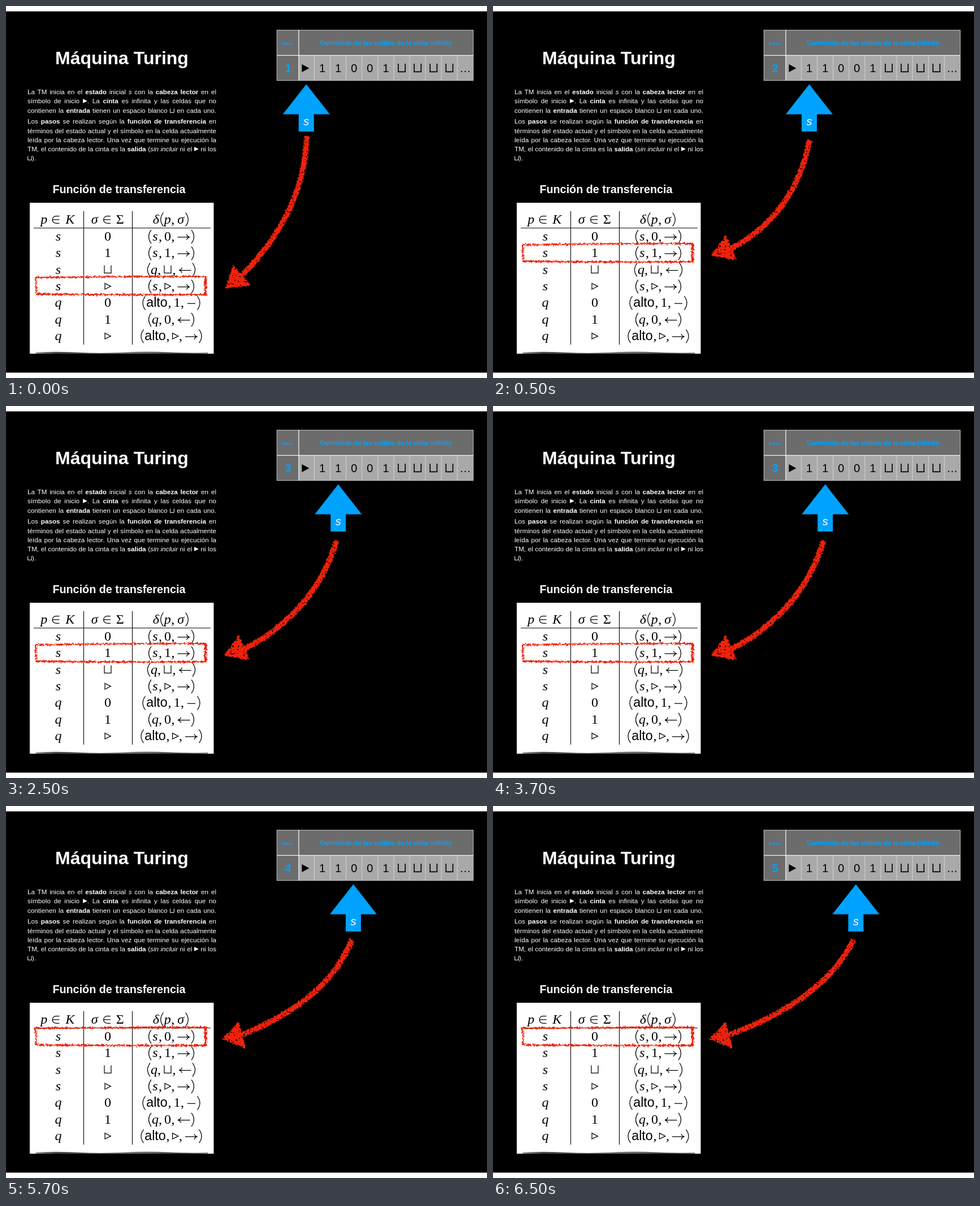
An HTML page for the animation above (8 s loop, 851 by 658 pixels).

```html
<!DOCTYPE html>
<html lang="es">
<head>
<meta charset="utf-8">
<title>Máquina Turing</title>
<style>
  html, body { margin: 0; width: 100%; height: 100%; overflow: hidden; background: #fff; }
  #stage { position: absolute; left: 0; top: 0; width: 851px; height: 658px; }
  svg text { font-family: "Liberation Sans", Arial, sans-serif; text-anchor: middle; }
  svg .math { font-family: "Liberation Serif", "Times New Roman", serif; font-size: 24px; }
  svg .it { font-style: italic; }
  .line {
    position: absolute; left: 38px; width: 334px; height: 16px;
    font: 11.7px/16px "Liberation Sans", Arial, sans-serif; color: #fff;
    white-space: nowrap; text-align: justify; text-align-last: justify;
  }
  .line.last { text-align-last: left; }
  .line svg { width: 8px; height: 8px; vertical-align: 0; }
</style>
</head>
<body>
<svg id="stage" viewBox="0 0 851 658">
  <defs>
    <filter id="chalk" filterUnits="userSpaceOnUse" x="30" y="220" width="640" height="300" color-interpolation-filters="sRGB">
      <feTurbulence type="fractalNoise" baseFrequency=".3" numOctaves="2" seed="7" result="grain"/>
      <feDisplacementMap in="SourceGraphic" in2="grain" scale="6" xChannelSelector="R" yChannelSelector="G" result="rough"/>
      <feColorMatrix in="grain" values="0 0 0 0 0  0 0 0 0 0  0 0 0 0 0  0 0 14 0 -9.1" result="holes"/>
      <feComposite in="rough" in2="holes" operator="out"/>
    </filter>
    <linearGradient id="fade">
      <stop offset="0" stop-color="#999"/><stop offset=".12" stop-color="#444"/>
      <stop offset=".5" stop-color="#777"/><stop offset=".88" stop-color="#444"/>
      <stop offset="1" stop-color="#999"/>
    </linearGradient>
    <filter id="soft" x="-5%" y="-100%" width="110%" height="300%"><feGaussianBlur stdDeviation=".7"/></filter>
  </defs>

  <rect y="9.5" width="851" height="639"/>
  <g fill="#fff" font-weight="bold">
    <text x="205" y="102.5" font-size="32">Máquina Turing</text>
    <text x="200" y="331" font-size="19.8">Función de transferencia</text>
  </g>

  <rect x="479" y="42.5" width="348" height="89.5" fill="#6c6c6c"/>
  <rect x="518" y="87" width="309" height="45" fill="#a9a9a9"/>
  <g id="tape"></g>
  <path d="M479 87.3H827M518 42V132" stroke="#f4f4f4" stroke-width="1.3"/>
  <rect x="479.3" y="42.8" width="347.4" height="89" fill="none" stroke="#c4c4c4"/>
  <g fill="#00a2ff" font-weight="bold">
    <text x="499.4" y="69" font-size="8" letter-spacing=".8">Paso</text>
    <text x="672" y="69.3" font-size="11.6">Contenido de las celdas de la cinta infinita</text>
    <text id="step" x="499" y="117.3" font-size="20"></text>
  </g>

  <g id="head">
    <path d="M0 138.5L41.5 191.5H13.5V222H-13.5V191.5H-41.5Z" fill="#00a2ff"/>
    <text class="it" x="0" y="211" font-size="20" fill="#fff">s</text>
  </g>

  <rect x="42" y="348" width="325.5" height="267" fill="#fff"/>
  <path d="M52 612.5Q90 611 130 612.8T210 612.6T290 612.6T358 612.4L357 615H53Z" fill="url(#fade)" filter="url(#soft)"/>
  <path d="M49 392.8H362M137.5 363V599M223.5 363V599" stroke="#000" stroke-width="1.1"/>
  <g id="rules"></g>

  <g filter="url(#chalk)" fill="none" stroke="#ee220c">
    <g id="frame"></g>
    <path id="tail" stroke-width="9.5"/>
    <path id="tip" fill="#ee220c" stroke-width="2" stroke-linejoin="round"/>
  </g>
</svg>

<script>
const $ = id => document.getElementById(id);

// Paragraph
const icon = d => `<svg viewBox="0 0 8 8">${d}</svg>`;
const play = icon('<path d="M0 .3L8 4L0 7.7Z" fill="#fff"/>');
const cup = icon('<path d="M.7 .5V7.4H7.3V.5" fill="none" stroke="#fff"/>');
const lines = [
  [156, "La TM inicia en el <b>estado</b> inicial <i>s</i> con la <b>cabeza lector</b> en el"],
  [172.4, `símbolo de inicio ${play}. La <b>cinta</b> es infinita y las celdas que no`],
  [189, `contienen la <b>entrada</b> tienen un espacio blanco ${cup} en cada uno.`],
  [208.3, "Los <b>pasos</b> se realizan según la <b>función de transferencia</b> en"],
  [224.5, "términos del estado actual y el símbolo en la celda actualmente"],
  [240.5, "leída por la cabeza lector. Una vez que termine su ejecución la"],
  [257, `TM, el contenido de la cinta es la <b>salida</b> (<i>sin incluir</i> ni el ${play} ni los`],
  [273.3, `${cup}).`]
];
lines.forEach(([base, html], i) => {
  const last = i === lines.length - 1 ? " last" : "";
  document.body.insertAdjacentHTML("beforeend",
    `<div class="line${last}" style="top:${base - 12}px">${html}</div>`);
});

// Tape cells
const pitch = 28.1;
$("tape").innerHTML = [..."▶11001⊔⊔⊔⊔…"].map((c, i) => {
  const x = 531.5 + i * pitch;
  const edge = i ? `<path d="M${x - pitch / 2} 88V131" stroke="#d2d2d2"/>` : "";
  if (c === "▶") return '<path d="M523.5 103L536.5 110L523.5 117Z"/>';
  if (c === "⊔") return `${edge}<path d="M${x - 6} 102V116.3H${x + 6.2}V102" fill="none" stroke="#000" stroke-width="1.7"/>`;
  return `${edge}<text x="${x}" y="117.3" font-size="20">${c}</text>`;
}).join("");

// Formula glyphs: slot width, then a stroked path or a text class
const shapes = {
  "(": [9, "M7.5-19Q-1.5-7 7.5 5"],
  ")": [9, "M1.5-19Q10.5-7 1.5 5"],
  "→": [24, "M1-6.2H22.5M17-11Q18.5-7 22.5-6.2Q18.5-5.4 17-1.4"],
  "←": [24, "M23-6.2H1.5M7-11Q5.5-7 1.5-6.2Q5.5-5.4 7-1.4"],
  "⊔": [16, "M2-15V-1.4H14V-15"],
  "▷": [12, "M1-12.5L11.3-7.2L1-2Z"],
  "−": [18, "M2-6.2H16"],
  "∈": [16, "M14.5-13H8.5A6.4 6.4 0 0 0 8.5-.2H14.5M2-6.6H14.5"]
};
const letters = {
  s: 11, q: 11, p: 12, δ: 11, σ: 14, K: 21, Σ: 17, 0: 12, 1: 12, ",": 10.5, alto: 38, " ": 6.8
};
const widthOf = g => shapes[g] ? shapes[g][0] : letters[g];

function formula(source, center, base) {
  const glyphs = source.match(/alto|./gu);
  let x = center - glyphs.reduce((sum, g) => sum + widthOf(g), 0) / 2;
  return glyphs.map(g => {
    const left = x, w = widthOf(g);
    x += w;
    if (g === " ") return "";
    if (shapes[g]) {
      return `<path transform="translate(${left} ${base})" d="${shapes[g][1]}" fill="none" stroke="#000" stroke-width="1.25"/>`;
    }
    if (g === "alto") return `<text x="${left + w / 2}" y="${base}" font-size="23.3">${g}</text>`;
    const mid = left + (g === "," ? 3.5 : w / 2);
    const slant = /[a-zK]|[σδ]/.test(g) ? " it" : "";
    return `<text class="math${slant}" x="${mid}" y="${base}">${g}</text>`;
  }).join("");
}

const rowGap = 29.35;
const table = [
  ["s", "0", "(s,0,→)"], ["s", "1", "(s,1,→)"], ["s", "⊔", "(q,⊔,←)"], ["s", "▷", "(s,▷,→)"],
  ["q", "0", "(alto,1,−)"], ["q", "1", "(q,0,←)"], ["q", "▷", "(alto,▷,→)"]
];
const columns = [92.5, 180, 292.5];
const tableRow = (cells, y) => cells.map((c, i) => formula(c, columns[i], y)).join("");
$("rules").innerHTML = tableRow(["p ∈ K", "σ ∈ Σ", "δ(p,σ)"], 384.5) +
  table.map((cells, i) => tableRow(cells, 415 + i * rowGap)).join("");

// Brushed highlight around the first row
$("frame").innerHTML = [
  ["M51 393.5Q200 391 355 391.5", 2.8],
  ["M53 422.5Q200 424.5 354 423.5", 3],
  ["M353 390V424.5", 4.6],
  ["M52 394L53.5 423", 2.2],
  ["M55 397L54.5 417", .7]
].map(([d, w]) => `<path d="${d}" stroke-width="${w}"/>`).join("");

// Steps: head position, highlighted row, tail curve, arrowhead
const toOne = "M387 441L412 407L429 448Z";
const toZero = "M383.5 412L411 384L423 427Z";
const steps = [
  { x: 531.3, row: 3, tail: "M532 230Q529 366 412 482", tip: "M389.5 498.5L402 460L431 493.5Z" },
  { x: 559.5, row: 1, tail: "M560 237Q534 371 418 431", tip: toOne },
  { x: 587.8, row: 1, tail: "M585 238Q546 366 418 432", tip: toOne },
  { x: 614.5, row: 0, tail: "M612 236Q570 345 414 406", tip: toZero },
  { x: 642, row: 0, tail: "M638 236Q587 343 414 406", tip: toZero }
];

let shown = -1;
function draw(ms) {
  const i = Math.floor((ms % 8000 + 1500) / 2000);
  if (i === shown) return;
  shown = i;
  const s = steps[i];
  $("step").textContent = i + 1;
  $("head").setAttribute("transform", `translate(${s.x} 0)`);
  $("frame").setAttribute("transform", `translate(0 ${s.row * 29})`);
  $("tail").setAttribute("d", s.tail);
  $("tip").setAttribute("d", s.tip);
}

const start = performance.now();
function tick() {
  draw(performance.now() - start);
  requestAnimationFrame(tick);
}
tick();
</script>
</body>
</html>
```
